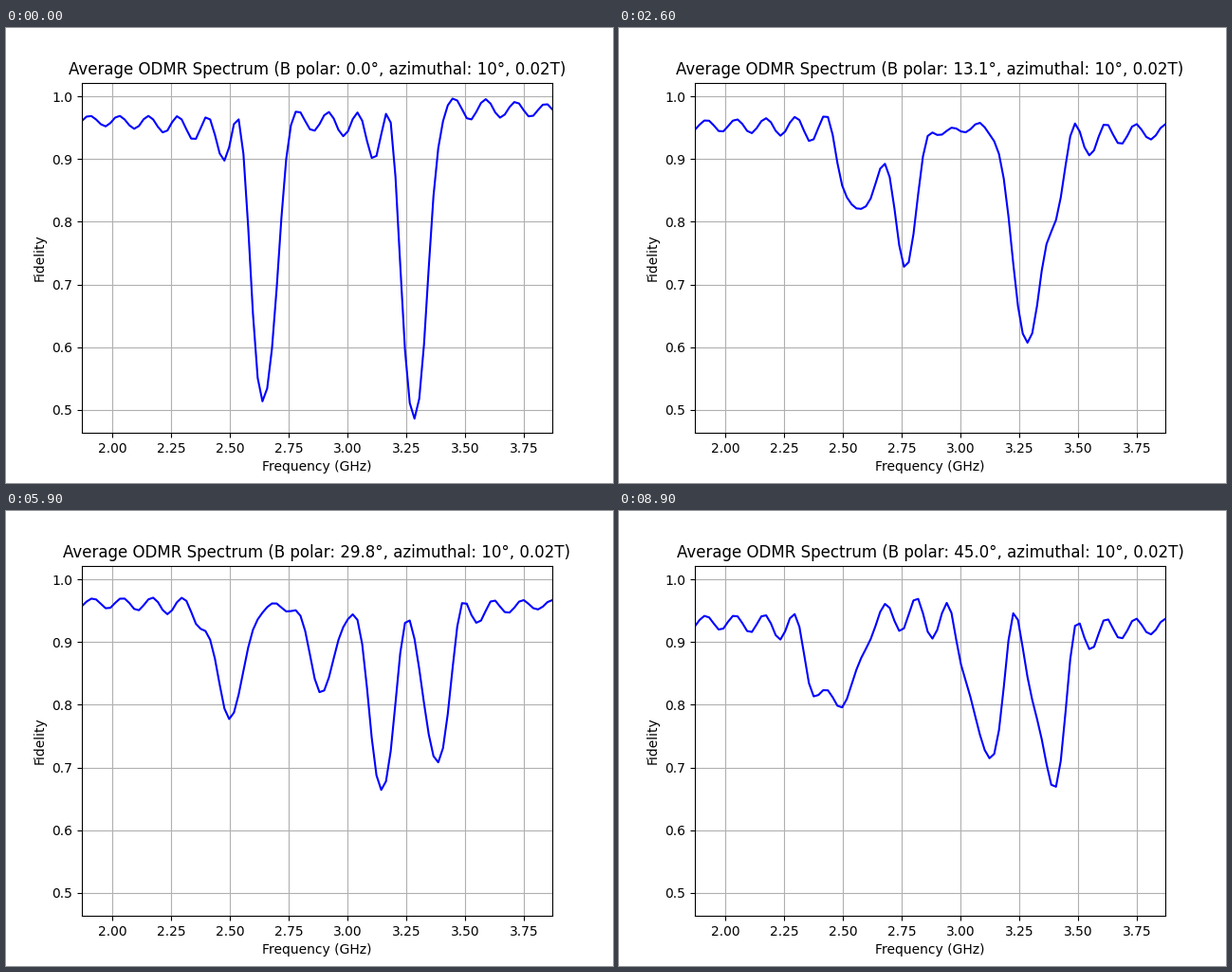
A matplotlib script for the animation above (9 s loop, 640 by 480 pixels).

```python
import numpy as np
import matplotlib.pyplot as plt
from matplotlib.animation import FuncAnimation

FRAMES = 90
D = 2.87            # zero-field splitting, GHz
GAMMA = 28.0        # gyromagnetic ratio, GHz/T
FIELD = 0.02        # T
AZIMUTH = 10        # degrees
RABI = 0.05         # drive amplitude, GHz
PULSE = 50.0        # pulse length in units of 1/(2 pi GHz)
STEPS = 500

polar = np.linspace(0, 45, FRAMES)
freq = np.linspace(D - 1, D + 1, 100)
nv_axes = np.array([(1, 1, 1), (1, -1, -1), (-1, 1, -1), (-1, -1, 1)]) / np.sqrt(3)


def field_direction():
    theta, phi = np.radians(polar), np.radians(AZIMUTH)
    return np.column_stack([np.sin(theta) * np.cos(phi),
                            np.sin(theta) * np.sin(phi),
                            np.cos(theta)])


def static_hamiltonian():
    """Spin-1 Hamiltonians in the basis |0>, |+>, |->, one per angle and NV axis."""
    cosine = (field_direction() @ nv_axes.T).ravel()
    along = GAMMA * FIELD * cosine
    across = GAMMA * FIELD * np.sqrt(1 - cosine ** 2)
    h = np.zeros((cosine.size, 3, 3))
    h[:, 1, 1] = h[:, 2, 2] = D
    h[:, 0, 1] = h[:, 1, 0] = across
    h[:, 1, 2] = h[:, 2, 1] = along
    return h


def propagator(h, dt):
    energy, v = np.linalg.eigh(h)
    return (v * np.exp(-1j * energy * dt)[:, None, :]) @ v.transpose(0, 2, 1)


def simulate():
    """Fidelity with |0> after the pulse, averaged over the four axes."""
    h = static_hamiltonian()
    dt = PULSE / STEPS
    half, full = propagator(h, dt / 2), propagator(h, dt)

    psi = np.zeros((len(h), 3, freq.size), complex)
    psi[:, 0] = 1
    psi = half @ psi
    for k in range(STEPS):
        kick = -RABI * np.sin(freq * (k + .5) * dt) * dt
        c, s = np.cos(kick), -1j * np.sin(kick)
        zero, bright = psi[:, 0].copy(), psi[:, 1].copy()
        psi[:, 0] = c * zero + s * bright
        psi[:, 1] = c * bright + s * zero
        psi = full @ psi
    psi = half.conj() @ psi      # step back to the end of the pulse

    stay = np.abs(psi[:, 0]) ** 2
    return stay.reshape(FRAMES, len(nv_axes), -1).mean(axis=1)


spectra = simulate()

fig, ax = plt.subplots(figsize=(6.4, 4.8), dpi=100)
line, = ax.plot(freq, spectra[0], "b-")
ax.set_xlim(freq[0], freq[-1])
ax.set_ylim(.4634, 1.0218)
ax.set_xlabel("Frequency (GHz)")
ax.set_ylabel("Fidelity")
ax.grid(True)


def update(n):
    line.set_ydata(spectra[n])
    ax.set_title(f"Average ODMR Spectrum (B polar: {polar[n]:.1f}°, "
                 f"azimuthal: {AZIMUTH}°, {FIELD}T)")
    return line,


anim = FuncAnimation(fig, update, frames=FRAMES, interval=100, repeat=True, repeat_delay=0)
plt.show()
```
